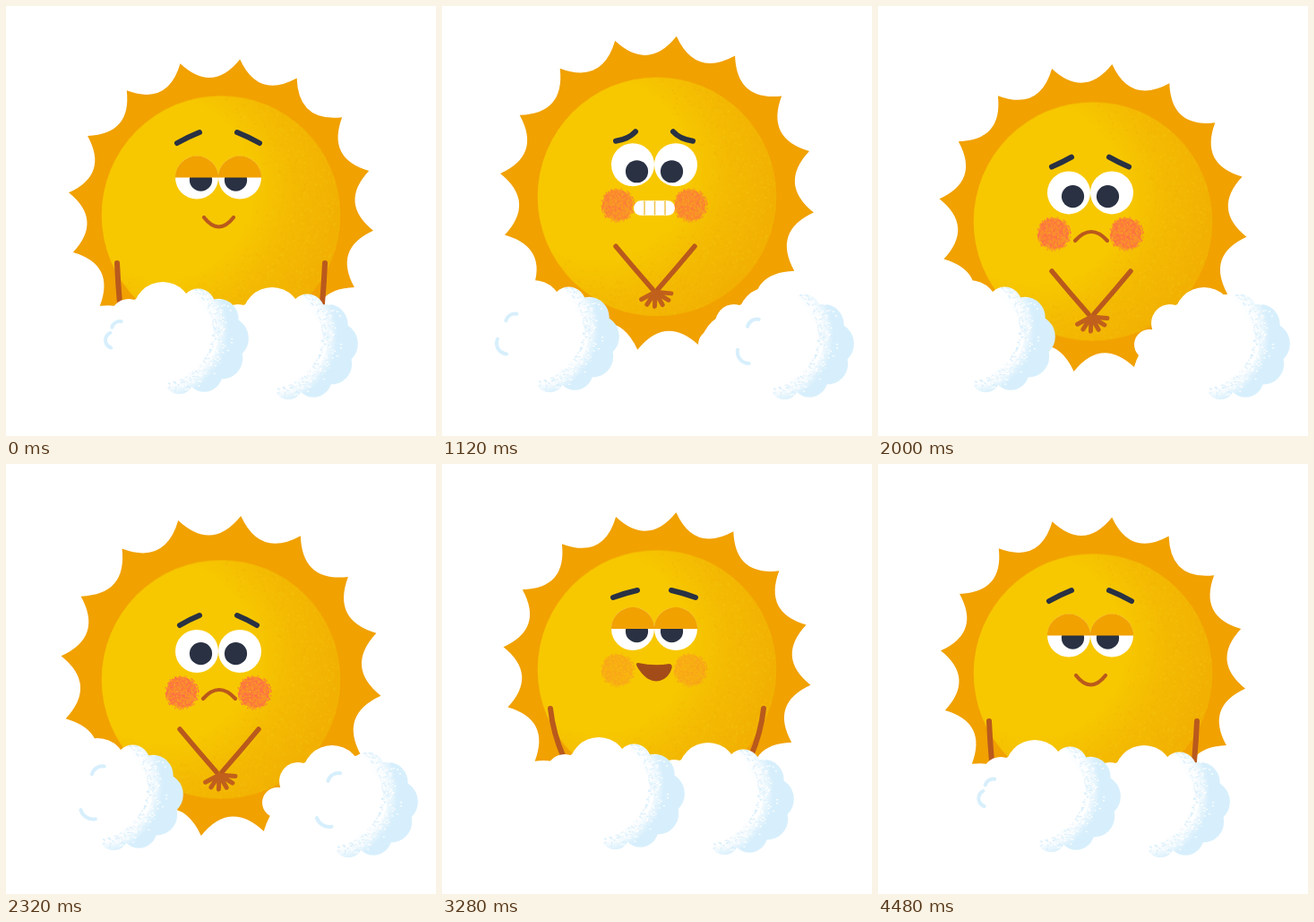
Animation, 480 px wide and 480 px high, one loop 4560 ms. Source, as an HTML page with a canvas:

```html
<!DOCTYPE html>
<html lang="en">
<head>
<meta charset="utf-8">
<title>Shy sun</title>
<style>
html, body { margin: 0; width: 100%; height: 100%; overflow: hidden; background: #fff; }
canvas { display: block; width: 480px; height: 480px; }
</style>
</head>
<body>
<canvas id="stage" width="480" height="480"></canvas>
<script>
const STEP = 80, COUNT = 57, ROLL = 19;
const RAY = '#f1a100', DARK = '#293143', BROWN = '#b9591c', BLUE = '#d7effc';
const ctx = document.getElementById('stage').getContext('2d');
const TAU = Math.PI * 2;

const mix = (a, b, k) => a + (b - a) * k;
const clamp = v => Math.max(0, Math.min(1, v));

// Smooth rise from 0 to 1 between a and b.
function ramp(i, a, b) {
  const k = clamp((i - a) / (b - a));
  return k * k * (3 - 2 * k);
}
// Rise between a and b, fall between c and d.
const span = (i, a, b, c, d) => ramp(i, a, b) - ramp(i, c, d);
// Half a sine wave between a and b.
const hump = (i, a, b) => Math.sin(Math.PI * clamp((i - a) / (b - a)));

function seeded(s) {
  return () => {
    s = (s * 1664525 + 1013904223) >>> 0;
    return s / 4294967296;
  };
}

function disc(c, x, y, r, fill) {
  c.fillStyle = fill;
  c.beginPath();
  c.arc(x, y, r, 0, TAU);
  c.fill();
}

function curve(x0, y0, cx, cy, x1, y1, color, width) {
  ctx.strokeStyle = color;
  ctx.lineWidth = width;
  ctx.lineCap = 'round';
  ctx.beginPath();
  ctx.moveTo(x0, y0);
  ctx.quadraticCurveTo(cx, cy, x1, y1);
  ctx.stroke();
}

const line = (x0, y0, x1, y1, color, width) => curve(x0, y0, x0, y0, x1, y1, color, width);

function sprite(w, h, paint) {
  const el = document.createElement('canvas');
  el.width = w;
  el.height = h;
  paint(el.getContext('2d'), seeded(7));
  return el;
}

const ball = sprite(270, 270, (c, rnd) => {
  const x0 = 70, y0 = 105;
  disc(c, 135, 135, 133.3, '#f7c800');
  c.globalCompositeOperation = 'source-atop';
  const g = c.createRadialGradient(x0, y0, 100, x0, y0, 195);
  g.addColorStop(0, 'rgba(242,178,4,0)');
  g.addColorStop(.45, 'rgba(242,178,4,.6)');
  g.addColorStop(1, 'rgba(242,176,2,.95)');
  c.fillStyle = g;
  c.fillRect(0, 0, 270, 270);
  for (let n = 0; n < 3200; n++) {
    const x = rnd() * 270, y = rnd() * 270;
    if (Math.hypot(x - x0, y - y0) < 100 + rnd() * 45) continue;
    c.fillStyle = rnd() < .5 ? 'rgba(240,172,0,.35)' : 'rgba(250,205,10,.3)';
    c.fillRect(x, y, 2, 1.5);
  }
});

const cheek = sprite(44, 44, (c, rnd) => {
  disc(c, 22, 22, 17, 'rgba(250,135,50,.85)');
  for (let n = 0; n < 450; n++) {
    const a = rnd() * TAU, r = Math.sqrt(rnd()) * 19;
    c.fillStyle = rnd() < .75 ? 'rgba(255,108,75,.7)' : 'rgba(248,165,50,.5)';
    c.fillRect(21.5 + Math.cos(a) * r, 21.5 + Math.sin(a) * r, 1.5, 1.5);
  }
});

// The cloud's right edge is at x = 180, its middle at y = 70.
const cloud = sprite(190, 145, (c, rnd) => {
  c.translate(180, 70);
  for (let n = 0; n < 6; n++) {
    const a = -1.15 + n * .54;
    disc(c, -80 + 55 * Math.cos(a), 5 + 43 * Math.sin(a), 16 + 8 * Math.cos(a), BLUE);
  }
  const puffs = [[-158, 3, 17], [-135, -21, 21], [-97, -28, 33], [-107, 6, 52], [-74, 2, 38]];
  puffs.forEach(([x, y, r]) => disc(c, x, y, r, '#fff'));
  c.globalCompositeOperation = 'source-atop';
  const g = c.createRadialGradient(-102, -8, 54, -102, -8, 78);
  g.addColorStop(0, '#fff');
  g.addColorStop(.5, 'rgba(255,255,255,.8)');
  g.addColorStop(1, 'rgba(255,255,255,0)');
  c.fillStyle = g;
  c.fillRect(-180, -70, 190, 145);
  for (let n = 0; n < 500; n++) {
    const a = mix(-.9, 1.45, rnd()), r = 60 + 24 * rnd() * rnd();
    c.fillStyle = rnd() < .6 ? '#fff' : 'rgba(215,239,252,.8)';
    c.fillRect(-102 + Math.cos(a) * r, -8 + Math.sin(a) * r, 2, 1.3);
  }
});

// How strongly each mood shows at step i.
const moods = i => ({
  awake: span(i, 8, 11, 33, 36),
  shy: span(i, 11, 14, 34, 37),
  worry: span(i, 12, 16, 22, 26),
  sad: span(i, 22, 26, 33, 36),
  sigh: span(i, 36, 39, 44, 48),
  blush: span(i, 11, 15, 34, 46),
  apart: span(i, 0, 6, 32, 36),
  push: hump(i, 4, 9) + hump(i, 29, 34)
});

function rays(i, dy) {
  const r = 176.3 - 5 * Math.cos(i / 8 * TAU);
  const gap = TAU / 16, turn = -82.9 * Math.PI / 180;
  const at = (k, d) => [240 + Math.cos(turn + k * gap) * d, 229.5 + dy + Math.sin(turn + k * gap) * d];
  ctx.fillStyle = RAY;
  ctx.beginPath();
  ctx.moveTo(...at(0, r));
  for (let k = 0; k < 16; k++) {
    ctx.quadraticCurveTo(...at(k + .5, r * .77), ...at(k + 1, r));
  }
  ctx.fill();
}

function arms({ shy, sigh }) {
  const top = mix(116 + 3 * sigh, 44, shy), end = mix(113 - 9 * sigh, 3, shy);
  const y0 = mix(287 - 10 * sigh, 289, shy), y1 = mix(332, 337, shy);
  const bend = mix(115 + sigh, 24, shy);
  const mid = mix(240, 238, shy);
  for (const s of [-1, 1]) {
    curve(mid + s * top, y0, mid + s * bend, (y0 + y1) / 2, mid + s * end, y1, BROWN, mix(6, 5.5, shy));
  }
  if (shy < .7) return;
  for (let a = .1; a < 2.7; a += .5) {
    line(238, 340, 238 + 18 * Math.cos(a), 340 + 16 * Math.sin(a), '#c0601c', 5);
  }
}

function eyes({ awake, shy, worry, sad, sigh }) {
  const y = 191.5 + 6.5 * shy + 4 * sad - 3.5 * sigh;
  for (const s of [-1, 1]) {
    const x = 237 + s * 24;
    ctx.save();
    disc(ctx, x, y, 24, '#fff');
    ctx.beginPath();
    ctx.arc(x, y, 24.2, 0, TAU);
    ctx.clip();
    disc(ctx, x - s * 4.5, y + 2.7 + 9.5 * worry, 12.6, DARK);
    ctx.fillStyle = RAY;
    ctx.fillRect(x - 26, y - 26, 52, 26 * (1 - awake));
    ctx.restore();
  }
}

function brows({ shy, worry, sigh }) {
  const out = 46 - 3 * shy, inner = 21 - 2 * sigh;
  const y0 = 153 + 20 * shy - 3 * worry, y1 = 141 + 21 * shy - 2 * worry + 4 * sigh;
  for (const s of [-1, 1]) {
    const bend = (out + inner) / 2 - 7 * worry;
    curve(237 + s * out, y0, 237 + s * bend, (y0 + y1) / 2 - 1 + 8 * worry, 237 + s * inner, y1, DARK, 6);
  }
}

function teeth() {
  ctx.fillStyle = '#fff';
  ctx.beginPath();
  ctx.roundRect(214, 238, 46, 16.5, 8);
  ctx.fill();
  for (let x = 226; x < 250; x += 11.5) line(x, 239, x, 253.5, '#efc34a', 1.5);
}

function sighing(open) {
  const y = 227;
  ctx.fillStyle = '#a34c1a';
  ctx.beginPath();
  ctx.moveTo(219, y - 1);
  ctx.quadraticCurveTo(237, y + 3, 254, y);
  ctx.quadraticCurveTo(259, y + 1, 255, y + 9 * open);
  ctx.bezierCurveTo(248, y + 22 * open, 232, y + 24 * open, 221, y + 8 * open);
  ctx.quadraticCurveTo(214, y - 1, 219, y - 1);
  ctx.fill();
}

function mouth(i, { sigh }) {
  if (i < 12 || i >= 45) curve(221, 236, 237.5, 257, 254, 236, BROWN, 4.2);
  else if (i < 25) teeth();
  else if (i < 36) curve(220, 255, 238, 235, 256, 255, BROWN, 4.2);
  else sighing(mix(.5, 1, sigh));
}

function cheeks({ blush, sad, sigh }) {
  ctx.globalAlpha = blush;
  for (const x of [174, 255]) ctx.drawImage(cheek, x, 221 + 5 * sad - 9 * sigh);
  ctx.globalAlpha = 1;
}

function sun(i, mood) {
  const dy = 7 * mood.shy - 4 * mood.sigh - 30 * hump(i, 9, 17);
  rays(i, dy);
  ctx.save();
  ctx.translate(0, dy);
  ctx.drawImage(ball, 105, 98.5);
  cheeks(mood);
  arms(mood);
  eyes(mood);
  brows(mood);
  mouth(i, mood);
  ctx.restore();
}

// Two curls that roll over the cloud towards its left side.
function curls(x, y, p) {
  const grow = clamp(p - 1) * clamp(15 - p);
  if (!grow) return;
  const k = ramp(p, 3, 13);
  const arc = (cx, cy, r, from, to) => {
    ctx.beginPath();
    ctx.arc(x + cx, y + cy, r, from, mix(from, to, grow));
    ctx.stroke();
  };
  ctx.strokeStyle = BLUE;
  ctx.lineWidth = 4;
  ctx.lineCap = 'round';
  arc(mix(-90, -145, k), mix(-18, -8, k), mix(12, 9, k), 3.4, 4.9);
  arc(mix(-100, -152, k), mix(15, 4, k), mix(15, 9, k), mix(1.4, 1.9, k), mix(2.8, 4.3, k));
}

function puff(x, y, p) {
  ctx.drawImage(cloud, x - 180, y - 70);
  curls(x, y, p % ROLL);
}

function clouds(i, { apart, push, sigh }) {
  puff(394 + 67 * apart + 10 * push, 375 - 3 * sigh, i + 12);
  puff(272 - 73 * apart - 12 * push, 369 - 2 * apart - 3 * sigh, i + 13);
}

function draw(time) {
  const i = Math.floor(time / STEP) % COUNT;
  const mood = moods(i);
  ctx.fillStyle = '#fff';
  ctx.fillRect(0, 0, 480, 480);
  sun(i, mood);
  clouds(i, mood);
}

const start = performance.now();
function loop() {
  draw(performance.now() - start);
  requestAnimationFrame(loop);
}
loop();
</script>
</body>
</html>
```
